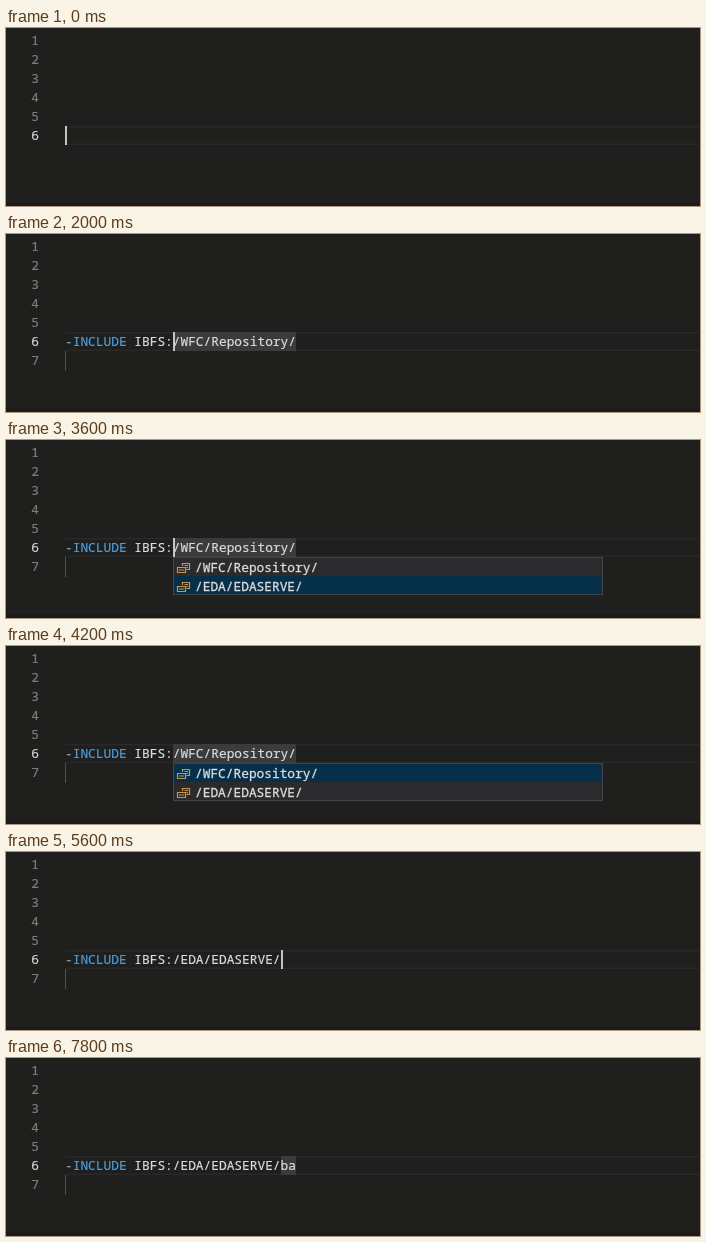
An HTML page that plays this animation: 694 by 178 pixels, repeating every 8 s.

```html
<!DOCTYPE html>
<html lang="en">
<head>
<meta charset="utf-8">
<title>Editor completion</title>
<style>
  html, body { margin: 0; width: 100%; height: 100%; overflow: hidden; background: #1f1f1e; }
  svg { display: block; }
  text {
    font: 12.83px "Noto Sans Mono", "DejaVu Sans Mono", monospace;
    color: #dcdcdc; fill: currentColor; stroke: currentColor; stroke-width: .2; white-space: pre;
  }
  #rows text, #hint text { stroke-width: .3; }
  .num { color: #7d7d7c; }
  .active { color: #d2d2d2; }
  tspan { fill: currentColor; stroke: currentColor; }
  .key { color: #4a9cdb; }
  .dash { color: #8397a5; }
  .match { color: #1592ea; }
  .note { color: #a9b8c3; }
</style>
</head>
<body>
<svg id="stage" width="694" height="178" viewBox="0 0 694 178">
  <rect width="694" height="178" fill="#1f1f1e"/>
  <rect y="174" width="694" height="4" fill="#1d1a1b"/>
  <g id="numbers"></g>
  <path d="M59 98.75H693M59 116.25H693" stroke="#292929" stroke-width="1.5"/>
  <g id="nextLine">
    <text class="num" x="25.3" y="131">7</text>
    <path d="M59.5 117V137" stroke="#654643"/>
  </g>
  <rect id="mark" y="98" height="19" fill="#3b3b3c"/>
  <text id="code" x="59" y="112"></text>

  <g id="hint">
    <rect x=".5" y="117.5" width="429" height="18" fill="#082d47" stroke="#34444f"/>
    <path d="M5.5 131V122.5H15.5V131" fill="none" stroke="#c5c5c5"/>
    <path d="M5 132.5H16" stroke="#c5c5c5" stroke-dasharray="2 1"/>
    <text x="22.6" y="132"><tspan class="match">-IN</tspan>CLUDE  <tspan class="note">For including an external file into yo…</tspan></text>
    <circle cx="409.3" cy="127.5" r="5.5" fill="#1b80b8"/>
    <path d="M409.3 124V125.4M409.3 126.6V131" stroke="#0a2d45" stroke-width="1.5"/>
  </g>

  <g id="menu">
    <rect x="167.5" y="117.5" width="429" height="37" fill="#2b2b2d" stroke="#40444a"/>
    <rect id="pick" x="168" width="428" height="18" fill="#062f4a"/>
    <g id="rows"></g>
  </g>
  <rect id="caret" y="98" width="2" height="19" fill="#c4c5c3"/>
</svg>
<script>
const LOOP = 8000, LEFT = 59, CHAR = 7.7;
const $ = id => document.getElementById(id);
const base = "-INCLUDE IBFS:";
const paths = ["/WFC/Repository/", "/EDA/EDASERVE/"];
const chosen = base + paths[0], done = base + paths[1];

// Each step changes only the listed parts of the state.
const start = { code: "", caret: 0, on: true, hint: false, next: false, mark: null, pick: -1 };
const steps = [
  [0, {}],
  [400, { on: false }],
  [1000, { code: "-", caret: 1, on: true }],
  [1400, { code: "-in", caret: 3, hint: true }],
  [1600, { code: "-inc", caret: 4 }],
  [1800, { code: "-incl", caret: 5 }],
  [2000, { code: chosen, caret: 14, hint: false, next: true, mark: [14, 30] }],
  [2400, { pick: 1 }],
  [3000, { on: false }],
  [3400, { on: true }],
  [4000, { on: false }],
  [4200, { pick: 0 }],
  [4400, { on: true }],
  [5000, { on: false }],
  [5200, { pick: 1 }],
  [5400, { on: true }],
  [5600, { code: done, caret: 28, mark: null, pick: -1 }],
  [6000, { on: false }],
  [6600, { on: true }],
  [7000, { code: done + "b", caret: 29 }],
  [7200, { code: done + "ba", caret: 30 }],
  [7400, { mark: [28, 30] }],
  [7800, { on: false }]
];
let last = start;
const states = steps.map(([at, change]) => (last = { ...last, ...change, at }));

const column = n => LEFT + n * CHAR;
const show = (id, on) => $(id).setAttribute("visibility", on ? "visible" : "hidden");

for (let n = 1; n <= 6; n++) {
  $("numbers").innerHTML +=
    `<text class="num ${n === 6 ? "active" : ""}" x="25.3" y="${19 * n - 2}">${n}</text>`;
}
paths.forEach((path, i) => {
  $("rows").innerHTML += `<g transform="translate(171 ${122 + 19 * i})">
    <path d="M5.5 4V1.5H12.5V7.5H9.5M7.5 3.5H11M9.5 5.5H11M.5 5.5H8.5V10.5H.5ZM2 8H7"
      fill="none" stroke="#c8954b" stroke-width="1.2"/>
    <text x="18" y="10">${path}</text></g>`;
});

function draw(s) {
  $("code").innerHTML = s.code.startsWith(base)
    ? `<tspan class="dash">-</tspan><tspan class="key">INCLUDE</tspan>${s.code.slice(8)}`
    : s.code;
  $("caret").setAttribute("x", Math.round(column(s.caret)));
  show("caret", s.on);
  show("nextLine", s.next);

  show("hint", s.hint);
  $("hint").setAttribute("transform", `translate(${Math.round(column(s.caret))} 0)`);

  show("mark", s.mark);
  if (s.mark) {
    $("mark").setAttribute("x", Math.round(column(s.mark[0])));
    $("mark").setAttribute("width", Math.round((s.mark[1] - s.mark[0]) * CHAR));
  }
  show("menu", s.pick >= 0);
  $("pick").setAttribute("y", 118 + 18 * Math.max(s.pick, 0));
}

let shown;
const origin = performance.now();
function tick() {
  const t = (performance.now() - origin) % LOOP;
  const state = states.findLast(s => s.at <= t);
  if (state !== shown) draw(shown = state);
  requestAnimationFrame(tick);
}
tick();
</script>
</body>
</html>
```
